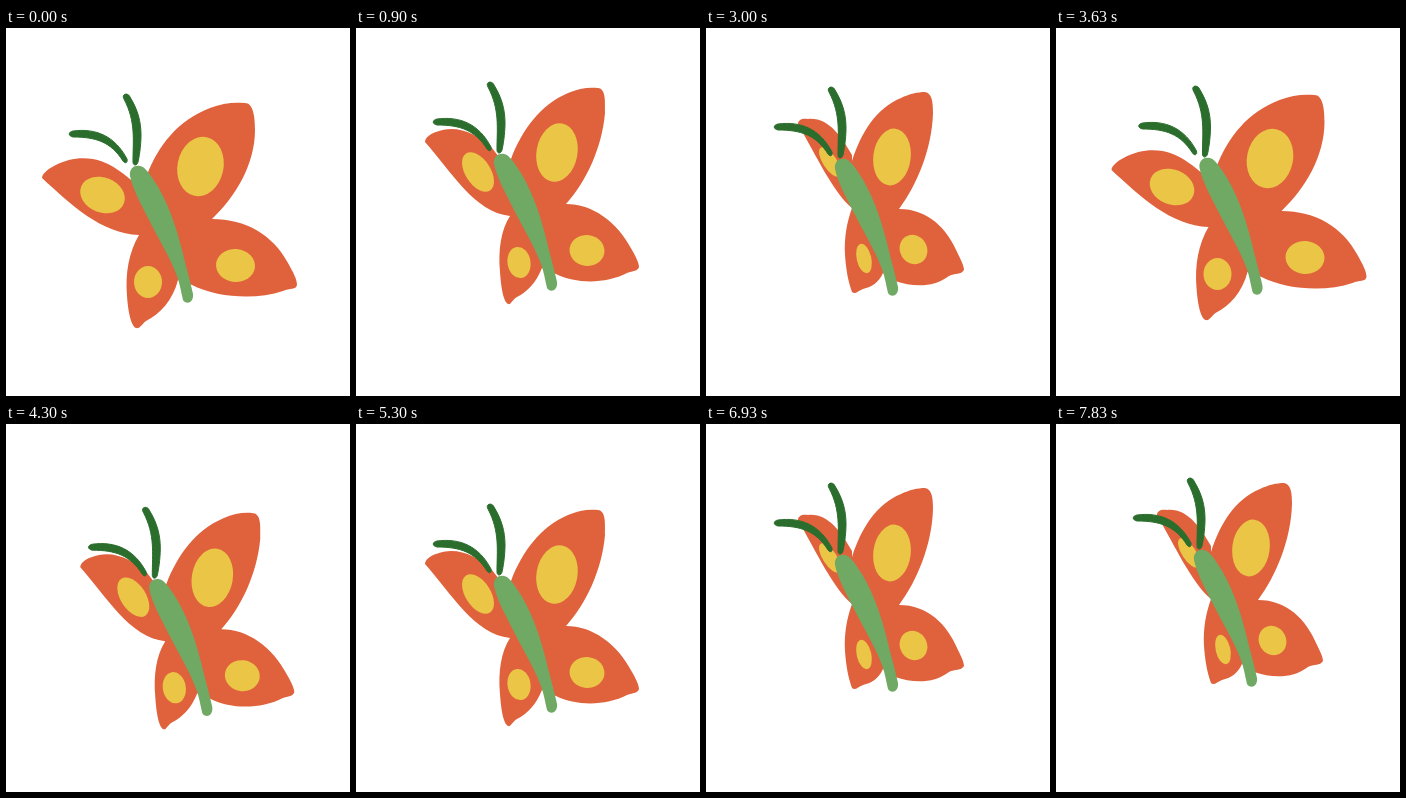
Recreate the animation shown at these times as an HTML page. Size 344x368 px, loop 7.91 s.

```html
<!DOCTYPE html>
<html lang="en">
<head>
<meta charset="utf-8">
<title>Butterfly</title>
<style>
  html, body { margin: 0; width: 100%; height: 100%; overflow: hidden; background: #fff; }
  svg { display: block; width: 100vw; height: 100vh; }
  .wings { fill: #e0623c; }
  .wings ellipse { fill: #eac546; }
  .feelers { fill: #2b6d2c; stroke: #2b6d2c; }
  .body { fill: #70a963; }
</style>
</head>
<body>
<svg viewBox="0 0 344 368">
  <g id="butterfly">
    <!-- open -->
    <g class="wings">
      <path d="M141,147 C152,118 172,92 204,80 C216,75 228,74 239,75 C247,75 249,88 249,102 C249,136 230,168 206,191
        C240,191 267,207 282,235 C287,244 291,251 291,257 C290,262 284,260 277,263 C250,272 212,270 186,257 L172,252
        C167,272 154,286 140,293 C136,296 134,301 130,300 C125,298 122,283 121,268 C119,245 123,224 133,207
        C96,206 64,176 36,150 C36,146 42,141 48,138 C72,125 96,130 112,142 C119,147 125,151 130,157 Z"/>
      <ellipse rx="23" ry="30" transform="translate(194.5 138.5) rotate(12)"/>
      <ellipse rx="23" ry="17.5" transform="translate(96.5 167) rotate(22)"/>
      <ellipse rx="19.5" ry="16.5" transform="translate(229.5 237.5) rotate(5)"/>
      <ellipse rx="14" ry="16" transform="translate(142 254)"/>
    </g>
    <!-- half closed -->
    <g class="wings">
      <path d="M141,143 C152,114 170,89 198,77 C209,72 219,71 228,72 C236,73 235,85 235,97 C232,132 216,166 196,188
        C222,188 247,205 262,234 C266,241 269,247 269,251 C268,255 263,255 257,257 C236,268 206,268 186,258 L172,252
        C166,267 157,276 147,281 C142,284 141,289 138,288 C133,285 131,270 130,256 C128,234 131,214 140,200
        C104,196 82,156 55,126 C55,122 60,118 66,116 C86,108 106,117 122,132 L132,145 Z"/>
      <ellipse rx="20.5" ry="29.5" transform="translate(187 136.5) rotate(10)"/>
      <ellipse rx="12.6" ry="22" transform="translate(108 156) rotate(-33)"/>
      <ellipse rx="17.5" ry="15.5" transform="translate(217 234.5) rotate(8)"/>
      <ellipse rx="11.5" ry="15.7" transform="translate(149 246.5) rotate(-9)"/>
    </g>
    <!-- closed -->
    <g class="wings">
      <path d="M141,140 C150,112 165,87 190,77 C198,73 207,71 214,71 C221,72 222,81 222,92 C221,128 206,164 188,188
        C217,188 236,207 247,233 C250,239 253,245 253,249 C250,254 244,252 238,255 C222,267 202,266 184,260 L172,252
        C168,261 161,266 152,268 C147,270 144,274 141,271 C137,260 135,248 134,234 C133,216 136,201 141,187
        C122,171 106,136 87,103 C87,99 91,97 97,98 C117,96 130,115 141,134 Z"/>
      <ellipse rx="18.7" ry="28.5" transform="translate(181 136) rotate(7)"/>
      <ellipse rx="7" ry="17" transform="translate(119 141) rotate(-33)"/>
      <ellipse rx="13.5" ry="15" transform="translate(202.5 228.5) rotate(-30)"/>
      <ellipse rx="7.3" ry="15" transform="translate(153 237.5) rotate(-13)"/>
    </g>
    <path class="feelers" d="M118,71 C115,66 122,64 124,69 C132,82 135,94 135,107 C135,118 133,130 132,134 C131,138 127,138 127,134
      C127,112 130,94 118,71 Z"/>
    <path class="feelers" d="M67,103 C90,100 109,108 121,131 C122,135 119,136 117,133 C105,114 90,109 67,109 C62,108 62,104 67,103 Z"/>
    <path class="body" d="M124,148 C123,140 129,137 134,138 C139,139 143,145 147,151 C161,171 170,198 176,222
      C179,235 184,252 187,266 C188,275 180,277 177,272 C175,264 174,256 171,248 C164,229 153,212 143,192 C135,176 127,162 124,148 Z"/>
  </g>
</svg>
<script>
  const LOOP = 7910, BEAT = 1100;
  const TICKS = [0, 130, 230, 330, 470, 570, 670, 800, 900, 1000]; // steps within one beat
  const FLAP = [0, 1, 2, 1];
  const FLIGHT = [[0, 0], [5, 7], [14, 14], [19.3, 17.2], [19.5, 9], [19.5, -8], [19.5, -16.2], [14, -12], [5, -7]];
  const butterfly = document.getElementById('butterfly');
  const wings = document.querySelectorAll('.wings');

  function draw(now) {
    const t = now % LOOP;
    const tick = TICKS.filter(x => x <= t % BEAT).length - 1;
    const n = (Math.floor(t / BEAT) * 10 + tick) % 36;
    const step = n > 4 ? n - 1 : n; // one step is held twice per cycle
    const [x, y] = FLIGHT[step % FLIGHT.length];
    const pose = FLAP[step % FLAP.length];
    butterfly.setAttribute('transform', `translate(${x} ${y})`);
    wings.forEach((w, i) => w.style.display = i === pose ? '' : 'none');
  }

  const start = performance.now();
  function loop() {
    draw(performance.now() - start);
    requestAnimationFrame(loop);
  }
  loop();
</script>
</body>
</html>
```
